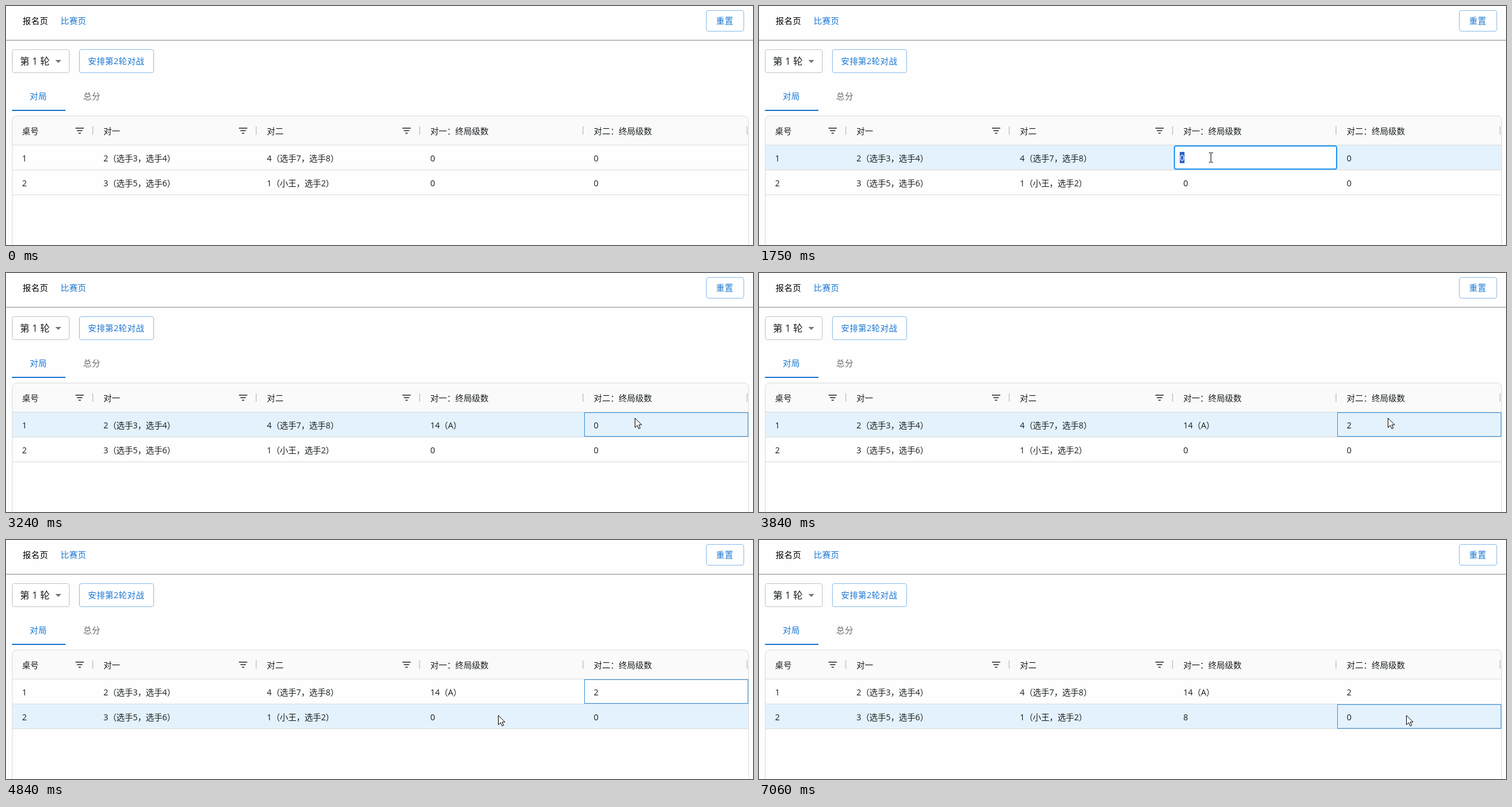
Write an HTML page that moves like this. It is 1257 px wide and 403 px high and loops after 8000 ms.

```html
<!DOCTYPE html>
<html lang="zh-CN">
<head>
<meta charset="utf-8">
<style>
  html, body { margin: 0; width: 100%; height: 100%; overflow: hidden; background: #fefefe; }
  svg { display: block; }
  text { font: 14px "Open Sans", "Noto Sans CJK SC", "Noto Sans CJK", sans-serif; fill: #181d1f; white-space: pre; }
  #rows text { letter-spacing: -.12px; }
  .ui { letter-spacing: .4px; }
  .blue { fill: #1976d2; }
  .grey { fill: #666; }
  .box { fill: #fff; stroke: #8cbbe9; }
  .focus { fill: none; stroke: #3a8fd8; }
  .edit { fill: #fff; stroke: #2196f3; stroke-width: 2; }
</style>
</head>
<body>
<svg width="1257" height="403">
  <path d="M0 57.5H1257" stroke="#a9a9a9"/>
  <path d="M0 58.5H1257" stroke="#d4d4d4"/>
  <text class="ui" x="28" y="30" style="fill:#000">报名页</text>
  <text class="ui blue" x="92" y="30">比赛页</text>
  <rect class="box" x="1178.5" y="7.5" width="63" height="35" rx="3.5"/>
  <text class="ui blue" x="1195" y="30">重置</text>
  <rect class="box" x="10.5" y="73.5" width="96" height="39" rx="3.5" style="stroke:#c4c4c4"/>
  <text x="23.5" y="99" style="font-size:16px;letter-spacing:.15px">第 1 轮</text>
  <path d="M83 91h10l-5 5z" fill="#757575"/>
  <rect class="box" x="123.5" y="73.5" width="125" height="39" rx="3.5"/>
  <text class="ui blue" x="138" y="98">安排第2轮对战</text>
  <text class="ui blue" x="40" y="157">对局</text>
  <text class="ui grey" x="130" y="157">总分</text>
  <path d="M10 176H100" stroke="#1976d2" stroke-width="2"/>
  <path d="M11 234V193a7 7 0 0 1 7-7H1242a7 7 0 0 1 7 7V234z" fill="#fafafa"/>
  <g id="head"></g>
  <g id="rows"></g>
  <path d="M11 234.5H1249M11 276.5H1249M11 318.5H1249" stroke="#d9dbdc"/>
  <rect x="10.5" y="185.5" width="1239" height="240" rx="7.5" fill="none" stroke="#d9dbdc"/>
  <g id="top"></g>
</svg>
<script>
const LOOP = 8000;
const columns = [27, 164, 439, 714, 989];
const $ = id => document.getElementById(id);
const label = (x, y, s, style = '') => `<text x="${x}" y="${y}" style="${style}">${s}</text>`;

$('head').innerHTML =
  ['桌号', '对一', '对二', '对一：终局级数', '对二：终局级数'].map((s, i) => label(columns[i], 216, s)).join('') +
  [146, 421, 696, 971, 1247].map(x => `<path d="M${x} 203v14" stroke="#d0d2d3" stroke-width="2"/>`).join('') +
  [124, 399, 674].map(x =>
    `<path d="M${x - 7} 206h14M${x - 4.5} 210.2h9M${x - 2} 214.4h4" stroke="#24292b" stroke-width="1.5"/>`).join('');

// Each step changes part of the state: pointer, hovered row, focused cell, open editor, scores.
const start = { at: null, hover: -1, focus: null, edit: null, a: '0', b: '0', c: '0' };
const steps = [
  [270, { at: [800, 282] }],
  [340, { at: [784, 250], hover: 0 }],
  [410, { at: [772, 226] }],
  [480, { at: [766, 219] }],
  [550, { at: [762, 236] }],
  [610, { at: [760, 247] }],
  [680, { at: [759, 252] }],
  [750, { at: [759, 254] }],
  [1020, { focus: [0, 3] }],
  [1750, { edit: '' }],
  [1950, { edit: '1' }],
  [2080, { edit: '14' }],
  [2280, { edit: null, a: '14（A）' }],
  [2880, { at: [850, 250] }],
  [2950, { at: [1000, 246] }],
  [3020, { at: [1058, 244] }],
  [3170, { focus: [0, 4] }],
  [3640, { edit: '2' }],
  [3840, { edit: null, b: '2' }],
  [4570, { at: [1050, 249] }],
  [4640, { at: [1005, 264] }],
  [4700, { at: [920, 283], hover: 1 }],
  [4770, { at: [850, 292] }],
  [4840, { at: [828, 295] }],
  [4910, { at: [827, 296] }],
  [4980, { at: [827, 297], focus: [1, 3] }],
  [5720, { edit: '' }],
  [5850, { edit: '8' }],
  [6050, { edit: null, c: '8' }],
  [6650, { at: [890, 291] }],
  [6720, { at: [1030, 286] }],
  [6790, { at: [1089, 295] }],
  [6990, { focus: [1, 4] }],
];

function drawRows({ hover, a, b, c }) {
  const data = [
    ['1', '2（选手3，选手4）', '4（选手7，选手8）', a, b],
    ['2', '3（选手5，选手6）', '1（小王，选手2）', c, '0'],
  ];
  const shade = hover < 0 ? '' : `<rect x="11" y="${235 + 42 * hover}" width="1238" height="41" fill="#e4f2fd"/>`;
  return shade + data.map((row, r) => row.map((s, i) => label(columns[i], 262 + 42 * r, s)).join('')).join('');
}

function drawFocus({ focus, edit }) {
  if (!focus) return '';
  const [row, col] = focus, x = columns[col] - 16, y = 235 + 42 * row, w = col === 3 ? 275 : 276;
  if (edit === null) return `<rect class="focus" x="${x + .5}" y="${y + .5}" width="${w - 1}" height="40"/>`;
  const tx = x + 10, caret = tx + 8 * edit.length - .5;
  return `<rect class="edit" x="${x + 1}" y="${y + 1}" width="${w - 2}" height="39" rx="3"/>` + (edit
    ? label(tx, y + 26, edit) + `<path d="M${caret} ${y + 12}v18" stroke="#000"/>`
    : `<rect x="${tx}" y="${y + 11}" width="8" height="19" fill="#2f62cc"/>` + label(tx, y + 26, '0', 'fill:#fff'));
}

function drawPointer({ at, edit }) {
  if (!at) return '';
  const shape = edit === null
    ? '<path d="M.5 .8V16.5L4.2 13L6.8 18.6L9.3 17.5L6.8 12H11.6z" fill="#fff" stroke="#000"/>'
    : '<path d="M-2 -6.5h3m1 0h3M-2 9.5h3m1 0h3M1.5 -6V9" fill="none" stroke="#000"/>';
  return `<g transform="translate(${at})">${shape}</g>`;
}

let shown = -1;
function frame() {
  const t = performance.now() % LOOP;
  const past = steps.filter(([time]) => time <= t);
  if (past.length !== shown) {
    shown = past.length;
    const state = Object.assign({}, start, ...past.map(([, change]) => change));
    $('rows').innerHTML = drawRows(state);
    $('top').innerHTML = drawFocus(state) + drawPointer(state);
  }
  requestAnimationFrame(frame);
}
frame();
</script>
</body>
</html>
```
